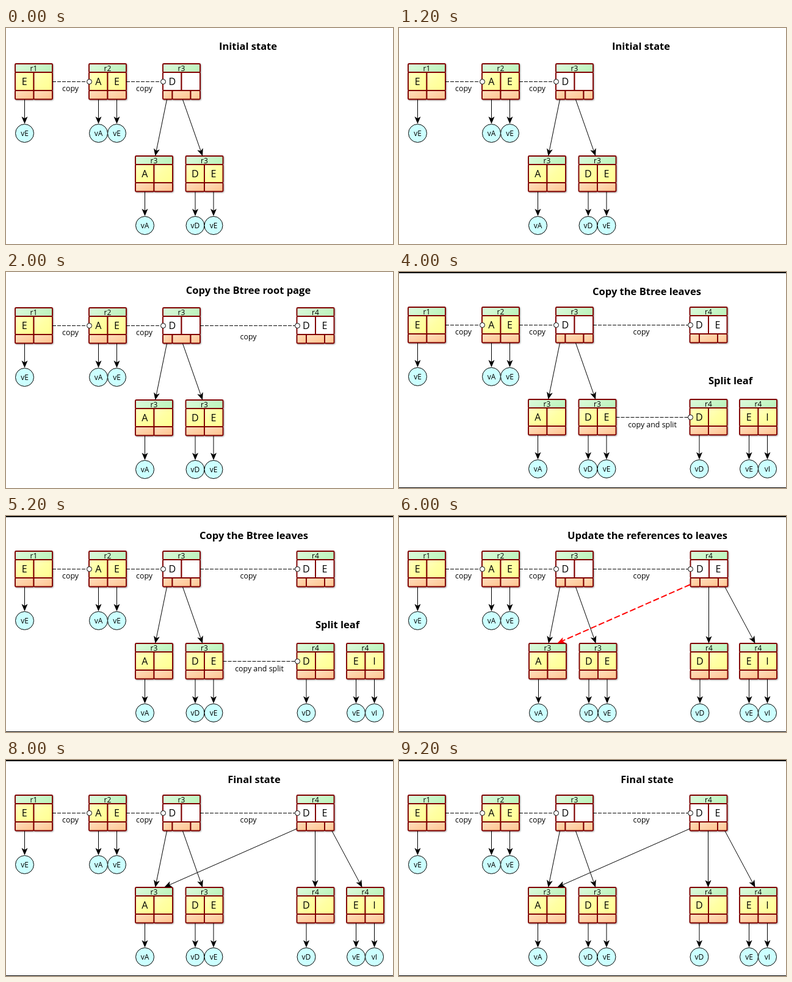
Animation of 634 by 356 pixels, one loop 10 s. Source, as an HTML page:

```html
<!DOCTYPE html>
<html lang="en">
<head>
<meta charset="utf-8">
<title>Copy-on-write tree</title>
<style>
  html, body { margin: 0; width: 100%; height: 100%; overflow: hidden; background: #fff; }
  svg { display: block; width: 634px; height: 356px; }
  text { font-family: "Open Sans", "Noto Sans", sans-serif; text-anchor: middle; }
  .title { font-size: 16.5px; font-weight: 700; }
  .key { font-size: 16px; }
  .label { font-size: 12.4px; }
  .small { font-size: 12px; }
  .cell { stroke: #800000; stroke-width: 1.9; }
  .box { filter: drop-shadow(1.5px 1.5px 1px rgba(0, 0, 0, .35)); }
  .line { stroke: #000; fill: none; }
</style>
</head>
<body>
<svg id="stage" viewBox="0 0 634 356">
  <defs>
    <linearGradient id="green" x2="1" y2=".3">
      <stop stop-color="#dcfadc"/><stop offset="1" stop-color="#bff5bf"/>
    </linearGradient>
    <linearGradient id="yellow" x2="1" y2="1">
      <stop stop-color="#ffffc4"/><stop offset=".45" stop-color="#ffffa4"/><stop offset="1" stop-color="#ffff90"/>
    </linearGradient>
    <linearGradient id="orange" x2="1" y2="1">
      <stop stop-color="#ffdfc0"/><stop offset="1" stop-color="#ffc38c"/>
    </linearGradient>
  </defs>
</svg>
<script>
const STEP = 2000;
const W = 61;
const stage = document.getElementById('stage');

const text = (cls, x, y, s) => `<text class="${cls}" x="${x}" y="${y}">${s}</text>`;

const cell = (x, y, w, h, fill) =>
  `<rect class="cell" x="${x}" y="${y}" width="${w}" height="${h}" rx="1.5" fill="${fill}"/>`;

function node(x, y, name, keys, root) {
  const half = W / 2;
  const body = root ? '#fff' : 'url(#yellow)';
  const cuts = root ? [0, 15.5, 45.5, W] : [0, half, W];
  let s = cell(x, y, W, 14, 'url(#green)');
  for (let i = 0; i < 2; i++) s += cell(x + i * half, y + 14, half, 30, body);
  for (let i = 1; i < cuts.length; i++)
    s += cell(x + cuts[i - 1], y + 44, cuts[i] - cuts[i - 1], 14.5, 'url(#orange)');
  s = `<g class="box">${s}</g>` + text('small', x + 30.5, y + 11.5, name);
  [...keys].forEach((k, i) => s += text('key', x + 15.3 + i * 30.2, y + 35, k));
  return s;
}

function arrow(x1, y1, x2, y2, red) {
  const angle = Math.atan2(y2 - y1, x2 - x1);
  const bx = x2 - 9 * Math.cos(angle), by = y2 - 9 * Math.sin(angle);
  const color = red ? '#f00' : '#000';
  const style = red ? 'stroke-width="2" stroke-dasharray="10 4"' : '';
  return `<path d="M${x1} ${y1}L${bx} ${by}" stroke="${color}" ${style}/>
    <path d="M0 0L-12 -5L-9 0L-12 5Z" fill="${color}"
      transform="translate(${x2} ${y2}) rotate(${angle * 180 / Math.PI})"/>`;
}

// A page together with an arrow and a value circle below each key
function leaf(x, y, name, keys) {
  let s = node(x, y, name, keys);
  [...keys].forEach((k, i) => {
    const cx = x + 15.5 + i * 30;
    s += arrow(cx, y + 59, cx, y + 99) +
      `<circle class="line" cx="${cx}" cy="${y + 114.5}" r="15" style="fill:#cff"/>` +
      text('small', cx, y + 119, 'v' + k);
  });
  return s;
}

function copyLink(x1, x2, y, label, lx, ly) {
  return `<path class="line" d="M${x1} ${y}H${x2 - 4}" stroke-dasharray="6 2"/>
    <circle class="line" cx="${x2}" cy="${y}" r="4" style="fill:#fff"/>` +
    text('label', lx, ly, label);
}

// y: vertical offset, dx: sideways nudge of the middle pages
const scenes = [
  { title: 'Initial state', x: 396.5, y: 0, dx: 0 },
  { title: 'Copy the Btree root page', x: 397, y: 0, dx: 0, root: true },
  { title: 'Copy the Btree leaves', x: 406, y: -1, dx: 0, root: true, leaves: true, split: true },
  { title: 'Update the references to leaves', x: 407, y: -1, dx: 1, root: true, leaves: true, refs: true, red: true },
  { title: 'Final state', x: 406.5, y: -1, dx: 0, root: true, leaves: true, refs: true }
];

function draw(c) {
  const top = 59 + c.y, low = 211 + c.y, mid = top + 29.5, base = top + 59, dx = c.dx;
  let s = text('title', c.x, c.leaves ? 38 : 36, c.title);
  if (c.leaves) s += '<path d="M0 0H634V2H0ZM0 355H634V356H0Z"/>';

  s += leaf(15, top, 'r1', 'E') + leaf(136, top, 'r2', 'AE') + node(257, top, 'r3', 'D', true);
  s += leaf(212 + dx, low, 'r3', 'A') + leaf(294.5 + dx, low, 'r3', 'DE');
  if (c.root) s += node(476.5 + dx, top, 'r4', 'DE', true);
  if (c.leaves) s += leaf(476.5 + dx, low, 'r4', 'D') + leaf(558, low, 'r4', 'EI');

  s += copyLink(76, 136.5, mid, 'copy', 105.5, top + 45);
  s += copyLink(197, 257.5, mid, 'copy', 226.5, top + 45);
  if (c.root) s += copyLink(318, 477.5, mid, 'copy', 397, c.leaves ? 103 : 111);
  if (c.split) {
    s += copyLink(355.5, 477.5, low + 29.5, 'copy and split', 415, 256);
    s += text('title', 543, 185, 'Split leaf');
  }

  s += arrow(263.5, base, 244.5 + dx / 2, low) + arrow(289.5, base, 322 + dx / 2, low);
  if (c.refs) {
    s += arrow(477, 113, 259.5, low - .5, c.red);
    s += arrow(506.5 + dx, base, 506.5 + dx, low);
    s += arrow(534, base, 583.5, low);
  }
  return `<g display="none">${s}</g>`;
}

stage.insertAdjacentHTML('beforeend', scenes.map(draw).join(''));
const groups = [...stage.children].slice(1);
const start = performance.now();

function tick() {
  const now = Math.floor((performance.now() - start) / STEP) % scenes.length;
  groups.forEach((g, i) => g.setAttribute('display', i === now ? 'inline' : 'none'));
  requestAnimationFrame(tick);
}
tick();
</script>
</body>
</html>
```
